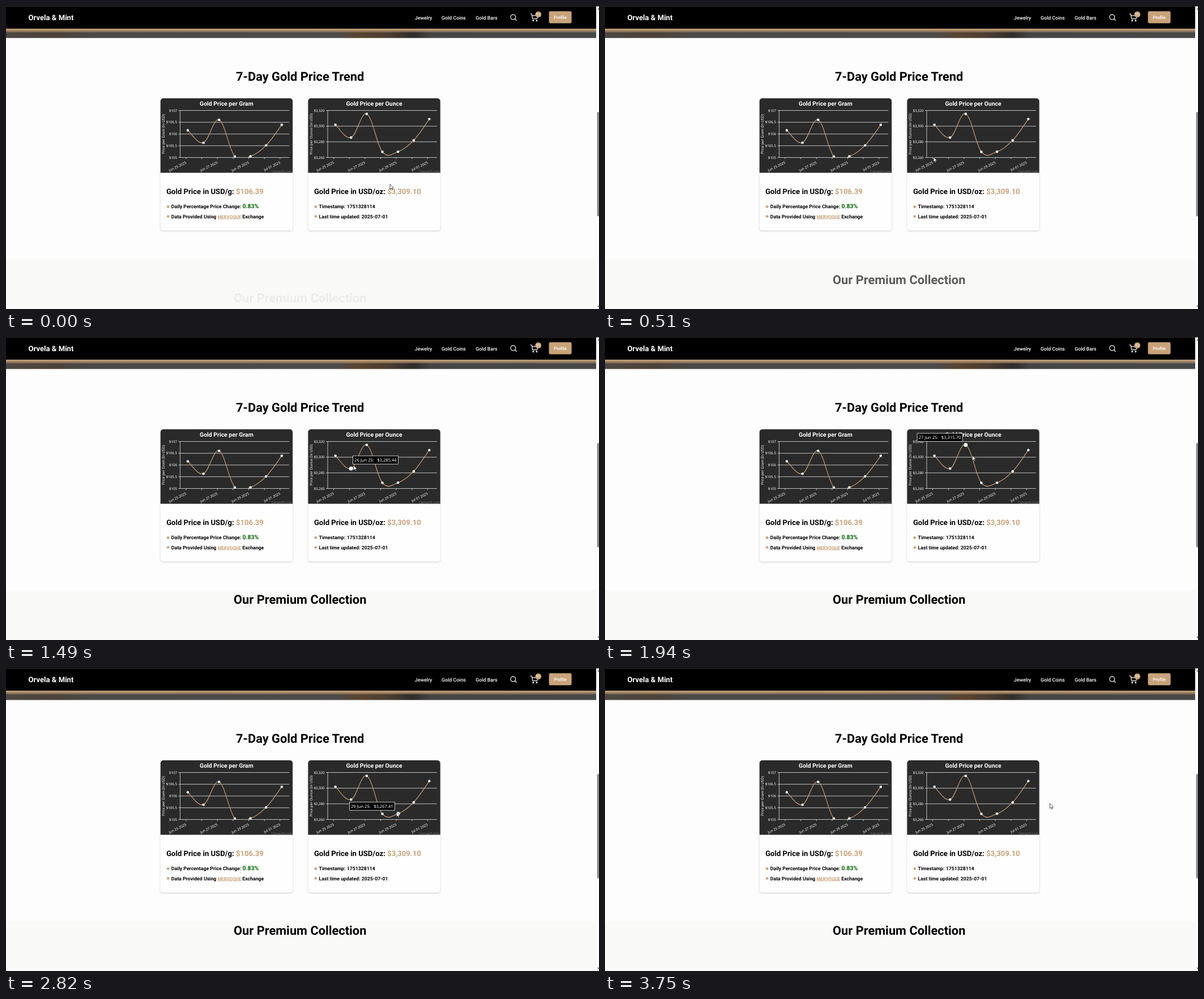
Animation, 1047 px wide and 535 px high, one loop 3.77 s. Source, as an HTML page:

```html
<!DOCTYPE html>
<html lang="en">
<head>
<meta charset="utf-8">
<title>Gold price trend</title>
<style>
  html, body { margin: 0; height: 100%; overflow: hidden; background: #fdfdfd; }
  svg { display: block; width: 100vw; height: 100vh; }
  text { font-family: Roboto, sans-serif; font-weight: 700; text-rendering: geometricPrecision; white-space: pre; }
  .axis { font-family: "Noto Sans", "Open Sans", sans-serif; font-weight: 400; font-size: 6.15px; fill: #fff; }
  .tip { font-family: "Noto Sans", "Open Sans", sans-serif; font-weight: 500; font-size: 7.6px; fill: #fff; }
  .nav { font-size: 8.8px; font-weight: 500; fill: #fff; }
  .big { font-size: 21.8px; text-anchor: middle; }
  .price { font-size: 13.09px; }
  .note { font-size: 8.72px; }
  .gold { fill: #c8a37a; }
  .card { fill: #fefefe; filter: drop-shadow(0 1px 1.5px rgba(0, 0, 0, .2)); }
  .icon { fill: none; stroke: #fff; stroke-width: 1.2; stroke-linecap: round; stroke-linejoin: round; }
</style>
</head>
<body>
<svg id="stage" viewBox="0 0 1047 535" preserveAspectRatio="none">
  <defs>
    <linearGradient id="hero">
      <stop offset="0" stop-color="#4d4843"/><stop offset=".08" stop-color="#4b4239"/>
      <stop offset=".15" stop-color="#4a4a49"/><stop offset=".56" stop-color="#4c4b4a"/>
      <stop offset=".6" stop-color="#59442f"/><stop offset=".65" stop-color="#4a3d32"/>
      <stop offset=".69" stop-color="#2f2c2a"/><stop offset=".72" stop-color="#454545"/>
      <stop offset="1" stop-color="#484848"/>
    </linearGradient>
    <linearGradient id="glow" x2="0" y2="1">
      <stop offset="0" stop-color="#c8a37a"/><stop offset=".5" stop-color="#b08f6a" stop-opacity=".85"/>
      <stop offset="1" stop-color="#c8a37a" stop-opacity="0"/>
    </linearGradient>
    <clipPath id="plot"><rect y="163" width="1047" height="104.8"/></clipPath>
  </defs>

  <rect y="447" width="1042" height="88" fill="#f9f9f8"/>
  <rect y="40" width="1042" height="16.5" fill="url(#hero)"/>
  <rect y="40" width="1042" height="7.5" fill="url(#glow)"/>
  <rect width="1042" height="40" fill="#000"/>
  <rect width="1047" height=".8" fill="#3a3a3a"/>
  <text x="39.6" y="24.6" font-size="13.09" fill="#fff">Orvela &amp; Mint</text>
  <text class="nav" x="721.8" y="24.2">Jewelry</text>
  <text class="nav" x="769" y="24.2">Gold Coins</text>
  <text class="nav" x="829.3" y="24.2">Gold Bars</text>
  <g class="icon">
    <circle cx="895.4" cy="19.6" r="4.4"/><path d="M898.7 22.9L901.3 25.5"/>
    <path d="M925.8 14h2.3l1.7 8.6h7.8l1.4-5.8h-10"/>
    <circle cx="930.9" cy="25.8" r=".9"/><circle cx="936.9" cy="25.8" r=".9"/>
  </g>
  <circle class="gold" cx="939.8" cy="14.9" r="5.4"/>
  <text x="939.8" y="17.3" font-size="6.6" fill="#fff" text-anchor="middle" style="font-weight:500">11</text>
  <rect class="gold" x="958.6" y="9.3" width="40" height="21.2" rx="2.4"/>
  <text x="978.6" y="22.5" font-size="7.85" fill="#fff" text-anchor="middle" style="font-weight:500">Profile</text>

  <rect x="1042" y="1" width="5" height="534" fill="#fcfcfc"/>
  <rect x="1043.6" y="187.3" width="5" height="184" rx="1.5" fill="#8b8b8b"/>
  <path d="M1044.2 6.5l2-3 2 3zM1044.2 529l2 3 2-3z" fill="#777"/>

  <text class="big" x="519.2" y="131.6">7-Day Gold Price Trend</text>
  <text class="big" id="next" x="519.2" y="471">Our Premium Collection</text>

  <g id="cards"></g>

  <text class="price" x="283.2" y="331.7">Gold Price in USD/g: <tspan class="gold">$106.39</tspan></text>
  <text class="note" x="291.8" y="357.4">Daily Percentage Price Change: <tspan font-size="10.47" fill="#006400">0.83%</tspan></text>
  <text class="note" x="291.8" y="374.5">Data Provided Using <tspan class="gold" font-size="7.85" text-decoration="underline">MERVOQUE</tspan> Exchange</text>
  <text class="price" x="543.9" y="331.7">Gold Price in USD/oz: <tspan class="gold">$3,309.10</tspan></text>
  <text class="note" x="552.5" y="357.4">Timestamp: 1751328114</text>
  <text class="note" x="552.5" y="374.5">Last time updated: 2025-07-01</text>

  <circle id="spot" r="3.5" fill="#fff"/>
  <g id="tip">
    <rect x=".5" y=".5" width="80" height="14.4" fill="#000" stroke="#ddd" stroke-width=".9"/>
    <text class="tip" id="day" x="3" y="10.4"></text>
    <text class="tip" id="cost" x="43.2" y="10.4"></text>
  </g>
  <path id="mouse" d="M0 0V9l2.1-1.9 1.4 3.2 1.4-.6-1.4-3.1h2.9z" fill="#fff" stroke="#111" stroke-width=".7"/>
</svg>
<script>
const $ = id => document.getElementById(id);
const clamp = (v, a, b) => Math.min(b, Math.max(a, v));
const ounce = [3301.87, 3285.44, 3315.7, 3267.28, 3267.41, 3281.91, 3309.1];
const days = ['25 Jun', '26 Jun', '27 Jun', '28 Jun', '29 Jun', '30 Jun', '01 Jul'];
const STEP = 27.64, TOP = 184.5, BASE = 267.5;

function spline(pts) {
  const k = .18, at = i => pts[clamp(i, 0, pts.length - 1)];
  let d = 'M' + pts[0];
  for (let i = 0; i < pts.length - 1; i++) {
    const [p, a, b, n] = [at(i - 1), at(i), at(i + 1), at(i + 2)];
    const c1 = a.map((v, j) => v + (b[j] - p[j]) * k);
    const c2 = b.map((v, j) => v - (n[j] - a[j]) * k);
    d += `C${c1} ${c2} ${b}`;
  }
  return d;
}

// Draws a card with its chart and returns the data points on the stage
function card(x, unit, values, min, max, labels) {
  const left = x + 34.6, right = x + 227.4;
  const pts = values.map((v, i) =>
    [x + 48.2 + i * STEP, BASE - (v - min) / (max - min) * (BASE - TOP)]);
  let s = `<rect class="card" x="${x}" y="163" width="233.3" height="233.6" rx="5"/>
    <path d="M${x} 294.6V168a5 5 0 0 1 5-5h223.3a5 5 0 0 1 5 5V294.6z" fill="#2a2a2a"/>
    <text x="${x + 116.6}" y="175.9" font-size="10.45" fill="#fff" text-anchor="middle">Gold Price per ${unit}</text>
    <text class="axis" text-anchor="middle" style="font-size:6.3px"
      transform="translate(${x + 7.6} 226)rotate(-90)">Price per ${unit} (In USD)</text>
    <text x="${x + 232}" y="293.6" class="axis" text-anchor="end" style="fill:#777;font-size:5.6px">CanvasJS.com</text>`;
  let lines = `M${left} ${TOP}V${BASE}`;
  labels.forEach((label, i) => {
    const y = BASE - i * (BASE - TOP) / (labels.length - 1);
    lines += `M${left - 3} ${y}H${right}`;
    s += `<text class="axis" x="${x + 29.2}" y="${y + 2.2}" text-anchor="end">${label}</text>`;
  });
  for (let i = 0; i < 7; i++) {
    const tx = x + 45.2 + i * STEP;
    lines += `M${tx} ${BASE}v2.7`;
    if (i % 2 == 0)
      s += `<text class="axis" text-anchor="end" transform="translate(${tx + 1} 277.8)rotate(-26)">${
        days[i].split(' ').reverse().join(' ')} 2025</text>`;
  }
  s += `<path d="${lines}" stroke="#e6e6e6" stroke-width=".8"/>
    <g clip-path="url(#plot)"><path d="${spline(pts)}" fill="none" stroke="#c8a37a" stroke-width="1.1"/>`;
  pts.forEach(([a, b]) => s += `<circle cx="${a}" cy="${b}" r="2.2" fill="#fff"/>`);
  s += '</g>';
  for (const y of [354.4, 371.5]) s += `<circle class="gold" cx="${x + 13.4}" cy="${y}" r="2.3"/>`;
  $('cards').innerHTML += s;
  return pts;
}

card(272.8, 'Gram', ounce.map(v => v / 31.1035), 105, 107, ['$105', '$105.5', '$106', '$106.5', '$107']);
const pts = card(533.4, 'Ounce', ounce, 3260, 3320, ['$3,260', '$3,280', '$3,300', '$3,320']);

const LOOP = 3770, pauses = [510, 2170, 3300], PAUSE = 100;
const path = [ // time, x, y
  [30, 678, 314.5], [510, 580, 266.5], [820, 586, 211], [1050, 587, 211], [1390, 613.5, 226.5],
  [1570, 626, 210], [1750, 640, 193], [2070, 670, 250], [2200, 668.5, 252], [2600, 687, 255],
  [2940, 725.5, 238.5], [3100, 743, 215], [3450, 785.5, 239]];
const hovers = [660, 1250, 1550, 2010, 2400, 2780, 3030], LEAVE = 3330;

function along(t) {
  const i = clamp(path.findIndex(p => p[0] > t), 1, path.length - 1);
  const end = t >= path[path.length - 1][0] ? path.length - 1 : i;
  const [a, b] = [path[end - 1], path[end]];
  const f = clamp((t - a[0]) / (b[0] - a[0]), 0, 1);
  return [1, 2].map(j => a[j] + (b[j] - a[j]) * f);
}

const tipPlace = i => [pts[i][0] + (i < 2 ? 5.2 : -86.2), pts[i][1] - 20.9];
const move = (id, [x, y]) => $(id).setAttribute('transform', `translate(${x} ${y})`);

function draw(time) {
  const now = time % LOOP;
  const t = pauses.reduce((sum, p) => sum - clamp(now - p, 0, PAUSE), now);

  const x = clamp(.13 + Math.max(0, t - 30) / 1047, 0, 1), rise = x * x * (3 - 2 * x);
  move('next', [0, 54.5 * (1 - rise)]);
  $('next').setAttribute('opacity', rise);
  move('mouse', along(t));

  const i = hovers.filter(h => h <= t).length - 1, shown = i >= 0 && t < LEAVE;
  for (const id of ['tip', 'spot']) $(id).setAttribute('visibility', shown ? 'visible' : 'hidden');
  if (shown) {
    const f = 1 - (1 - clamp((t - hovers[i]) / 200, 0, 1)) ** 2;
    const from = tipPlace(Math.max(0, i - 1)), to = tipPlace(i);
    move('tip', from.map((v, j) => v + (to[j] - v) * f));
    move('spot', pts[i]);
    $('day').textContent = days[i] + ' 25:';
    $('cost').textContent = '$' + ounce[i].toLocaleString('en-US', { minimumFractionDigits: 2 });
  }
}

const start = performance.now();
(function tick() {
  draw(performance.now() - start);
  requestAnimationFrame(tick);
})();
</script>
</body>
</html>
```
